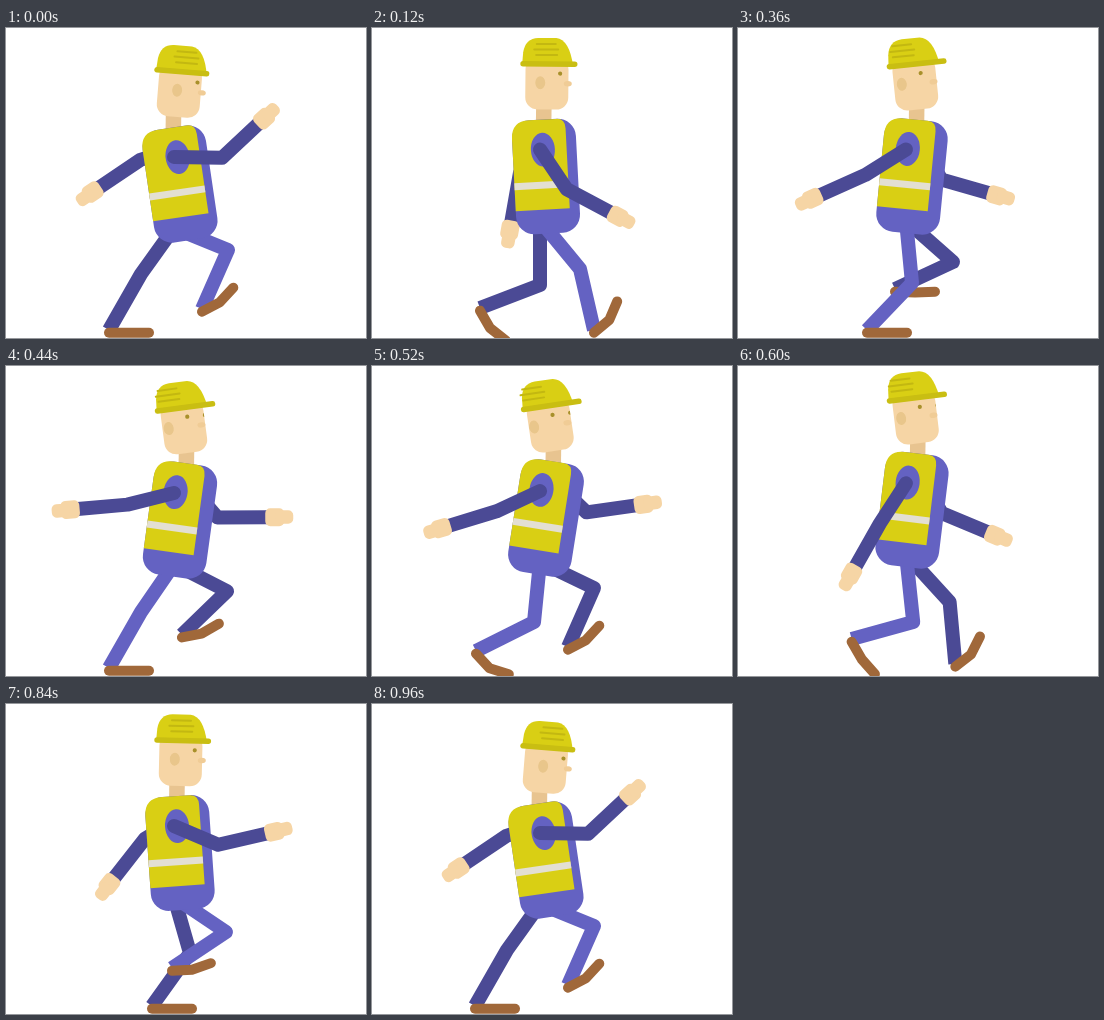
An HTML page that plays this animation: 360x310 px, repeating every 1000 ms.

```html
<!DOCTYPE html>
<html lang="en">
<head>
<meta charset="utf-8">
<title>Walking worker</title>
<style>
html, body { margin: 0; width: 100%; height: 100%; overflow: hidden; background: #fff; }
svg { display: block; width: 100%; height: 100%; }
.limb { fill: none; stroke-width: 14; stroke-linejoin: round; }
.dark { stroke: #4b4a95; }
.light { stroke: #6462c2; }
.arm { stroke-linecap: round; }
.shoe { fill: none; stroke: #a0683a; stroke-width: 10; stroke-linecap: round; stroke-linejoin: round; }
.skin { fill: #f6d5a5; }
.shade { fill: #e9c68b; }
.purple { fill: #6462c2; }
.yellow { fill: #d9cf14; }
.eye { fill: #a8902a; }
</style>
</head>
<body>
<svg viewBox="0 0 360 310">
  <defs>
    <clipPath id="face"><rect x="-21.5" y="-52" width="43" height="52" rx="12"/></clipPath>
    <g id="hand" class="skin">
      <rect x="-2" y="-9" width="19" height="18" rx="5"/>
      <rect x="8" y="-7" width="18" height="13.5" rx="5"/>
    </g>
  </defs>
  <path id="farArm" class="limb arm dark"/>
  <use id="farHand" href="#hand"/>
  <path id="farLeg" class="limb dark"/>
  <path id="farShoe" class="shoe"/>
  <path id="nearLeg" class="limb light"/>
  <path id="nearShoe" class="shoe"/>
  <path id="neck" fill="none" stroke="#e8c490" stroke-width="15.5"/>
  <g id="torso">
    <rect class="purple" x="-32" y="-57" width="64" height="114" rx="18"/>
    <path id="vest" class="yellow"/>
    <rect id="band" x="-32" y="5" height="7" fill="#e3dfd2"/>
    <ellipse id="hole" class="purple" cy="-27" rx="12" ry="17"/>
  </g>
  <g id="head">
    <rect class="skin" x="-21.5" y="-52" width="43" height="52" rx="12"/>
    <g clip-path="url(#face)">
      <ellipse id="ear" class="shade" cy="-26.7" rx="5" ry="6.5"/>
      <circle id="eye" class="eye" cy="-36" r="2.1"/>
      <circle id="eye2" class="eye" cy="-35.5" r="2.1"/>
    </g>
    <ellipse id="nose" cy="-26" rx="4" ry="2.7" fill="#f0cc96"/>
    <path class="yellow" d="M-25-44L-24-57Q-22-71-9-71.500L9-71.500Q22-70 26-44Z"/>
    <path id="ribs" d="M-9.500-65.500H9.500M-12-60H12M-10-54.500H11" fill="none" stroke="#c3b811" stroke-width="2" stroke-linecap="round"/>
    <path id="brim" fill="none" stroke="#c9be12" stroke-width="5.500" stroke-linecap="round"/>
  </g>
  <path id="nearArm" class="limb arm dark"/>
  <use id="nearHand" href="#hand"/>
</svg>
<script>
const LOOP = 1000, STEP = 40, CYCLE = 24;
const part = {};
document.querySelectorAll('svg [id]').forEach(el => part[el.id] = el);

// Rows are [step, ...values].
const lean = [[0, -8.4], [3, -3], [9, 5.6], [13, 9], [17, 3.3], [21, -4]];
const height = [[0, 156], [3, 148.5], [5, 142], [6, 143.5], [9, 148.5], [11, 154],
  [13, 152], [16, 142], [17, 144], [21, 149]];
// upper arm angle, forearm angle
const nearSwing = [[0, 1, -43], [3, 56, 28], [9, 148, 156], [11, 166, 175],
  [13, 155, 163], [17, 83, 64], [21, 23, -13]];
const farSwing = [[0, 162, 146], [3, 132, 100], [9, 61, 16], [13, 44, -8],
  [17, 90, 70], [21, 149, 128]];
// knee x y, ankle x y, heel angle, toe angle
const stride = [
  [0, 222, 222, 196, 281, -28, -47],
  [3, 208, 241, 222, 302, -40, -67],
  [4, 209, 238, 209, 302, 0, 0],
  [8, 184, 249, 146, 302, 0, 0],
  [9, 174, 255, 129, 302, 0, 0],
  [11, 135, 246, 103, 302, 0, 0],
  [13, 162, 256, 104, 285, 47, 17],
  [14, 168, 257, 108, 280, 60, 38],
  [17, 191, 251, 128, 262, 60, 60],
  [20, 215, 234, 157, 261, 2, -2],
  [21, 220, 228, 166, 264, -3, -19]
];

// Smooth periodic interpolation without overshoot.
function sample(keys, time) {
  const n = keys.length, t = time % CYCLE;
  const at = k => keys[(k + n) % n];
  const when = k => at(k)[0] + Math.floor(k / n) * CYCLE;
  let i = n - 1;
  while (keys[i][0] > t) i--;
  const span = when(i + 1) - when(i), u = (t - when(i)) / span;
  return keys[0].slice(1).map((_, j) => {
    const val = k => at(k)[j + 1];
    const rate = k => (val(k + 1) - val(k)) / (when(k + 1) - when(k));
    const slope = k => {
      const a = rate(k - 1), b = rate(k);
      return a * b > 0 ? 2 * a * b / (a + b) : 0;
    };
    const a = val(i), b = val(i + 1);
    return a + (b - a) * u * u * (3 - 2 * u)
      + span * u * (1 - u) * (slope(i) * (1 - u) - slope(i + 1) * u);
  });
}

const rad = deg => deg * Math.PI / 180;
const polar = ([x, y], len, deg) => [x + len * Math.cos(rad(deg)), y + len * Math.sin(rad(deg))];
const line = (...pts) => 'M' + pts.map(p => p.map(v => v.toFixed(2)).join(' ')).join('L');
const set = (id, name, value) => part[id].setAttribute(name, value);
const place = (id, [x, y], deg) => set(id, 'transform', `translate(${x} ${y}) rotate(${deg})`);

function drawArm(side, shoulder, [upper, fore]) {
  const elbow = polar(shoulder, 48, upper), wrist = polar(elbow, 50, fore);
  set(side + 'Arm', 'd', line(shoulder, elbow, wrist));
  place(side + 'Hand', wrist, fore);
}

function drawLeg(side, hip, [kx, ky, ax, ay, heel, toe]) {
  const start = [ax, ay + 2.7], ball = polar(start, 20, heel);
  set(side + 'Leg', 'd', line(hip, [kx, ky], [ax, ay]));
  set(side + 'Shoe', 'd', line(start, ball, polar(ball, 20, toe)));
}

function draw(step) {
  const [tilt] = sample(lean, step), [y] = sample(height, step);
  const hip = [168, y + 44];

  drawArm('far', [180, y - 39], sample(farSwing, step));
  drawArm('near', [168, y - 27], sample(nearSwing, step));
  drawLeg('near', hip, sample(stride, step));
  drawLeg('far', hip, sample(stride, step + 11));

  const edge = 21 - 0.35 * tilt;
  place('torso', [174, y], tilt);
  set('vest', 'd', `M-32 33V-39Q-32-57-14-57H${edge - 9}Q${edge}-57 ${edge}-47V33Z`);
  set('band', 'width', edge + 32);
  set('hole', 'cx', -3.5 - 0.6 * tilt);
  set('neck', 'd', line([174 + 0.8 * tilt, y - 50], [174.3 + 0.8 * tilt, y - 74]));

  place('head', [176.5 + 0.62 * tilt, y - 67], -1.7 - 0.75 * tilt);
  set('ear', 'cx', -9 - 0.8 * tilt);
  set('eye', 'cx', 10.8 - 0.78 * tilt);
  set('eye2', 'cx', 28.5 - 0.78 * tilt);
  set('nose', 'cx', 20 - 0.3 * tilt);
  set('ribs', 'transform', `translate(${-4 - tilt} 0)`);
  set('brim', 'd', `M-24-45.500H${28.7 + 0.35 * tilt}`);
}

function tick(now) {
  draw(Math.floor(now % LOOP / STEP));
  requestAnimationFrame(tick);
}
draw(0);
requestAnimationFrame(tick);
</script>
</body>
</html>
```
